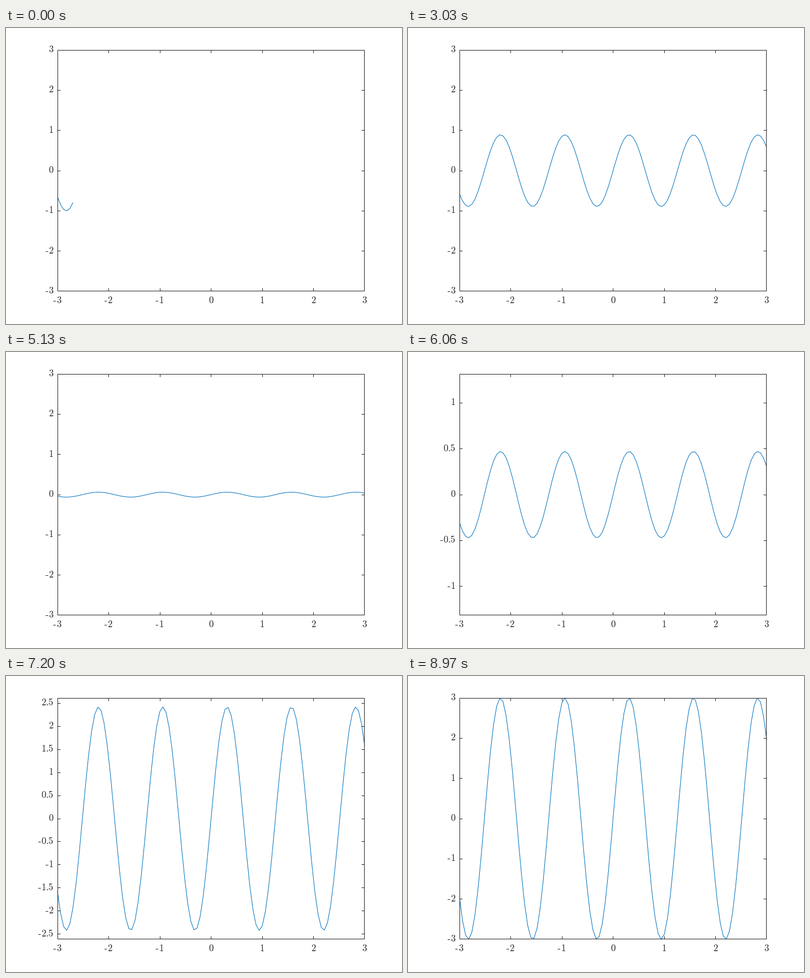
A matplotlib script that plays this animation: 700 px wide and 525 px high, repeating every 9 s.

```python
import math

import matplotlib.pyplot as plt
import numpy as np
from matplotlib.animation import FuncAnimation

W, H, DPI = 700, 525, 100
LEFT, RIGHT, TOP, BOTTOM = 91, 634, 39, 467
MID, HALF = (TOP + BOTTOM) / 2, (BOTTOM - TOP) / 2
TICK = 5.4
PX = 72 / DPI            # one pixel in points
EM = 12 / PX             # label size in pixels
INK, BLUE = "#262626", "#0072BD"
STEPS = 100              # frames per stage

fig = plt.figure(figsize=(W / DPI, H / DPI), dpi=DPI, facecolor="white")
ax = fig.add_axes([0, 0, 1, 1])
ax.set_xlim(0, W)
ax.set_ylim(H, 0)
ax.axis("off")


def stroke(color, width=1, **kw):
    return ax.plot([], [], color=color, lw=width * PX, snap=False,
                   solid_capstyle="butt", **kw)[0]


def label():
    return ax.text(0, 0, "", fontsize=12, color=INK, ha="left",
                   va="baseline", math_fontfamily="cm")


def crisp(v, end=math.inf):
    """Centre of the pixel holding v, kept inside the given end."""
    return min(math.floor(v + 1e-6), end - 1) + 0.5


def set_segments(line, segments):
    """Show separate straight pieces (x0, y0, x1, y1) with one line."""
    xs, ys = [], []
    for x0, y0, x1, y1 in segments:
        xs += [x0, x1, math.nan]
        ys += [y0, y1, math.nan]
    line.set_data(xs, ys)


def number_width(s):
    return EM * sum({".": 0.278, "-": 0.333}.get(c, 0.5) for c in s)


def place(text, s, left, base):
    """Set a number; returns the hyphen's segment when it is negative."""
    dashes = []
    left -= 0.7          # side bearing of the glyphs
    base = round(base)
    if s[0] == "-":
        y = crisp(base - 0.216 * EM)
        dashes.append((left + 0.011 * EM, y, left + 0.276 * EM, y))
        left += number_width("-")
        s = s[1:]
    text.set_text(f"${s}$")
    text.set_position((left, base))
    return dashes


def to_x(x):
    return LEFT + (x + 3) / 6 * (RIGHT - LEFT)


curve = stroke(BLUE, solid_joinstyle="round")
frame_box = stroke(INK, solid_joinstyle="miter")
x0, x1 = crisp(LEFT), crisp(RIGHT, RIGHT)
y0, y1 = crisp(TOP), crisp(BOTTOM, BOTTOM)
frame_box.set_data([x0, x1, x1, x0, x0, x1], [y0, y0, y1, y1, y0, y0])
x_ticks, y_ticks, x_dashes, y_dashes = (stroke(INK) for _ in range(4))
y_labels = [label() for _ in range(11)]

marks, dashes = [], []
for v in range(-3, 4):
    x = crisp(to_x(v), RIGHT)
    marks += [(x, BOTTOM, x, BOTTOM - TICK), (x, TOP, x, TOP + TICK)]
    dashes += place(label(), str(v), to_x(v) - number_width(str(v)) / 2, 488)
set_segments(x_ticks, marks)
set_segments(x_dashes, dashes)

xs = np.linspace(-3, 3, 100)
wave = np.sin(5 * xs)


def ease(t):
    return 6 * t / (5 * t + 1)


def draw_y_axis(limit):
    step = next(s for s in (0.2, 0.5, 1) if math.floor(limit / s + 1e-9) <= 5)
    n = math.floor(limit / step + 1e-9)
    marks, dashes = [], []
    for text in y_labels:
        text.set_text("")
    for text, k in zip(y_labels, range(-n, n + 1)):
        v = round(k * step, 1)
        at = MID - v / limit * HALF
        y = crisp(at, BOTTOM)
        marks += [(LEFT, y, LEFT + TICK, y), (RIGHT, y, RIGHT - TICK, y)]
        s = f"{v:g}"
        dashes += place(text, s, 84.5 - number_width(s), at + 4)
    set_segments(y_ticks, marks)
    set_segments(y_dashes, dashes)


def update(i):
    stage, k = divmod(i, STEPS)
    g = ease((k + 1) / STEPS)
    shown, amp, limit = len(xs), 1, 3
    if stage == 0:                       # trace the wave from the left
        shown = math.floor(g * (len(xs) - 1) + 1e-9) + 1
    elif stage == 1:                     # flatten it
        amp = 1 - g
    else:                                # grow the wave and the axis
        amp, limit = 3 * g, 1 + 2 * g
    curve.set_data(to_x(xs[:shown]), MID - amp * wave[:shown] / limit * HALF)
    draw_y_axis(limit)
    return [curve, y_ticks, y_dashes, *y_labels]


anim = FuncAnimation(fig, update, frames=3 * STEPS, interval=30,
                     init_func=lambda: update(0), repeat=True, repeat_delay=0)
plt.show()
```
